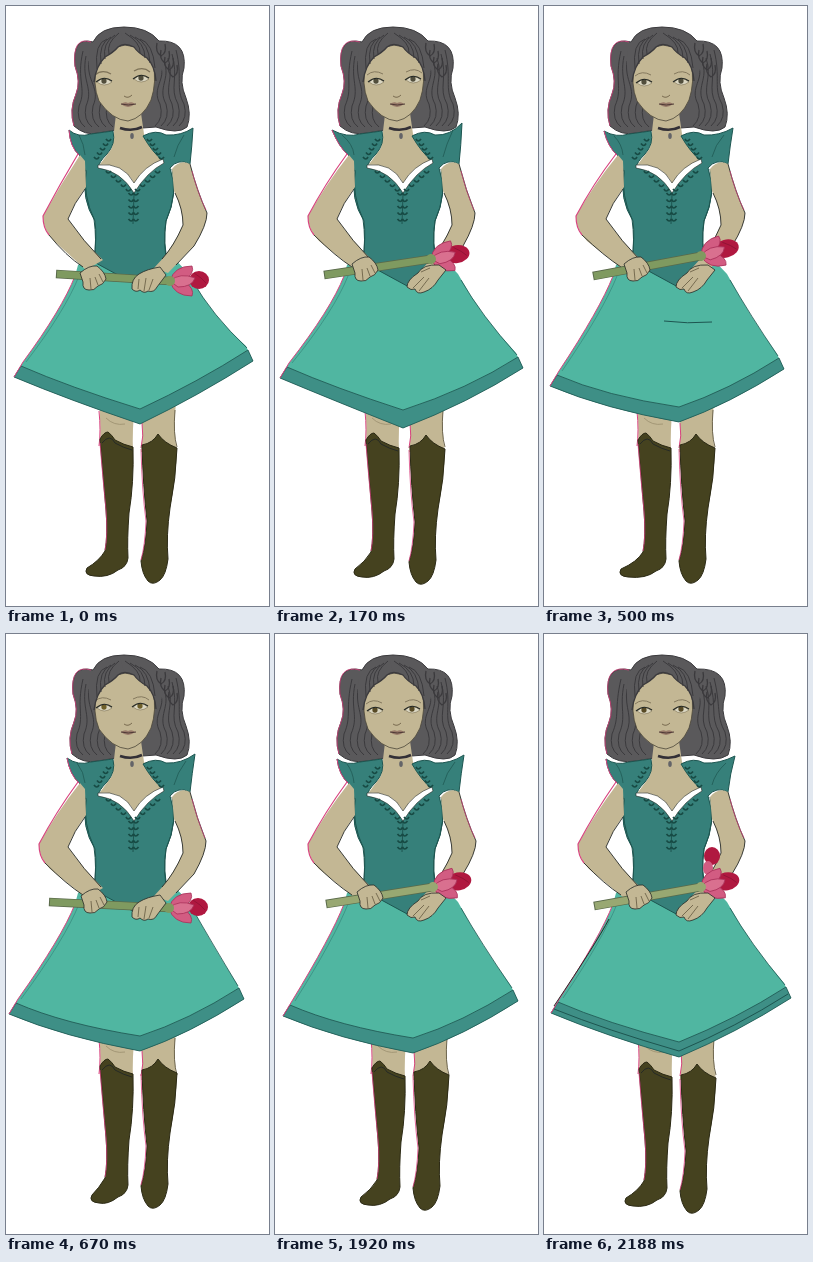
Recreate the animation shown at these times as an HTML page with a canvas. Size 263x600 px, loop 2.26 s.

```html
<!DOCTYPE html>
<html lang="en">
<head>
<meta charset="utf-8">
<title>Girl with a flower</title>
<style>
html, body { margin: 0; width: 100%; height: 100%; overflow: hidden; background: #fff }
canvas { display: block; width: 263px; height: 600px }
</style>
</head>
<body>
<canvas id="stage" width="263" height="600"></canvas>
<script>
const ctx = document.getElementById('stage').getContext('2d');
const LOOP = 2260;
const C = {
  ink: '#262a26', fringe: '#d8437f', skin: '#c3b794', hair: '#5a595b', strand: '#3b3a3d',
  bodice: '#36807a', dark: '#1d5550', skirt: '#50b6a1', hem: '#3e8f86', boot: '#45421f',
  pink: '#d25c82', red: '#b01840'
};

// hair: left and right x; sleeves: tips; elbows: x; hem: left, point, right;
// boots: offsets of left and right; stem: cut end, flower end
const poses = [
  { start: 0, hair: [67, 184], sleeves: [63, 124, 187, 122], elbows: [37, 201], eyes: [98, 76, 135, 73],
    hem: [8, 371, 134, 418, 247, 355], boots: [0, -1, 0, 0], foot: 79,
    stem: [50, 268, 164, 275], tilt: 0, grip: true, hand: [-3, 9], soft: true },
  { start: 170, hair: [64, 184], sleeves: [57, 124, 187, 117], elbows: [33, 200], eyes: [101, 76, 138, 74],
    hem: [5, 372, 128, 422, 248, 362], boots: [-3, 0, -1, 1], foot: 78,
    stem: [49, 269, 156, 253], tilt: -.15, hand: [0, 0], wide: true },
  { start: 330, hair: [63, 186], sleeves: [60, 125, 188, 120], elbows: [30, 199], eyes: [103, 78, 137, 76],
    hem: [3, 378, 132, 416, 241, 361], boots: [-3, 2, -1, 1], foot: 75,
    stem: [48, 272, 150, 239], tilt: -.58, hand: [2, 0], closed: true },
  { start: 500, hair: [65, 184], sleeves: [60, 125, 189, 122], elbows: [32, 201], eyes: [100, 77, 137, 76],
    hem: [6, 380, 135, 416, 240, 363], boots: [0, 0, 0, 0], foot: 75,
    stem: [49, 270, 157, 250], tilt: -.25, hand: [3, 0], crease: true },
  { start: 670, hair: [65, 184], sleeves: [61, 124, 189, 120], elbows: [33, 200], eyes: [98, 74, 134, 73],
    hem: [3, 380, 134, 417, 238, 365], boots: [0, -2, 0, -3], foot: 84,
    stem: [43, 268, 163, 274], tilt: 0, grip: true, hand: [-2, 4], iris: '#6f602b' },
  { start: 1920, hair: [63, 183], sleeves: [62, 125, 189, 121], elbows: [33, 201], eyes: [100, 77, 137, 76],
    hem: [8, 382, 138, 419, 243, 367], boots: [3, 0, 3, -1], foot: 84,
    stem: [51, 270, 158, 253], tilt: -.18, hand: [5, 0], iris: '#574a25', pale: true },
  { start: 2080, hair: [62, 187], sleeves: [62, 125, 191, 122], elbows: [34, 201], eyes: [100, 77, 137, 76],
    hem: [7, 379, 135, 423, 247, 364], boots: [1, 1, 1, 2], foot: 80,
    stem: [50, 272, 157, 253], tilt: -.18, hand: [5, 0], iris: '#574a25', pale: true, echo: true }
];

function fill(d, color, edge, width = 1) {
  const path = new Path2D(d);
  ctx.fillStyle = color;
  ctx.fill(path);
  if (edge) line(path, edge, width);
}

function line(d, color = C.ink, width = 1) {
  ctx.strokeStyle = color;
  ctx.lineWidth = width;
  ctx.stroke(d instanceof Path2D ? d : new Path2D(d));
}

function oval(x, y, rx, ry, color) {
  ctx.beginPath();
  ctx.ellipse(x, y, rx, ry, 0, 0, 7);
  ctx.fillStyle = color;
  ctx.fill();
}

function at(x, y, turn, draw) {
  ctx.save();
  ctx.translate(x, y);
  ctx.rotate(turn);
  draw();
  ctx.restore();
}

function legs({ boots: [lx, ly, rx, ry], foot }) {
  at(lx, 0, 0, () => {
    fill('M93 395L129 395Q126 425 127 446L94 442Q95 420 93 395Z', C.skin);
    line('M93 405Q95 425 93 440', C.fringe);
    line('M100 412Q108 420 119 418', '#a39776');
  });
  at(rx, 0, 0, () => {
    fill('M134 395L170 395Q167 425 171 446L135 446Q138 425 134 395Z', C.skin);
    line('M136 417Q138 430 135 442', C.fringe);
    line('M169 404Q167 428 171 441', '#6d654e');
  });
  const toe = foot - lx;
  at(lx, ly, 0, () => {
    fill(`M94 434Q98 427 102 427Q106 430 109 435Q118 440 127 442Q128 478 123 508
      Q121 535 122 553Q121 562 112 565Q102 573 ${toe + 9} 571Q${toe - 2} 570 ${toe + 2} 563
      Q93 556 99 546Q102 530 100 505Q97 470 94 434Z`, C.boot, '#2b2914');
    line('M94 438Q97 475 100 505Q102 530 99 545', C.fringe, .8);
    line('M96 438Q104 428 109 438Q118 443 126 445');
  });
  at(rx, ry, 0, () => {
    fill(`M136 439Q147 437 152 428Q158 437 171 442Q170 472 164 502Q160 530 162 553
      Q160 569 154 574Q147 580 142 575Q136 568 135 555Q140 540 141 515Q137 480 136 439Z`, C.boot, '#2b2914');
    line('M135 443Q136 485 140 515Q139 540 135 554', C.fringe, .8);
  });
}

function skirt({ hem: [lx, ly, px, py, rx, ry], crease, echo, wide }) {
  const band = wide ? 18 : 15;
  const bottom = `Q${lx + 55} ${ly + 23} ${px} ${py}Q${rx - 55} ${ry + 35} ${rx} ${ry}`;
  fill(`M88 247L72 259L69 270Q56 303 ${lx + 9} ${ly - 15}L${lx} ${ly}${bottom}
    L${rx - 7} ${ry - 15}Q205 309 183 268L163 247Z`, C.skirt);
  fill(`M${lx + 7} ${ly - 11}L${lx} ${ly}${bottom}L${rx - 5} ${ry - 11}
    Q${rx - 55} ${ry + 21} ${px} ${py - band}Q${lx + 55} ${ly + 10} ${lx + 7} ${ly - 11}Z`, C.hem, C.dark, .8);
  line(`M69 270Q56 303 ${lx + 9} ${ly - 15}L${lx} ${ly}`, C.fringe);
  line(`M73 270Q59 305 ${lx + 12} ${ly - 15}`, '#35877b', .7);
  line(`M186 274Q206 309 ${rx - 6} ${ry - 13}`, C.dark, .8);
  if (crease) line('M120 315Q143 318 168 316', C.dark);
  if (echo) {
    line(`M65 285Q53 308 ${lx + 3} ${ly - 7}`, C.ink);
    line(`M${lx + 3} ${ly - 4}Q${lx + 55} ${ly + 17} ${px} ${py - 6}Q${rx - 55} ${ry + 29} ${rx - 3} ${ry - 4}`, C.dark);
  }
}

function hairBack({ hair: [l, r] }) {
  fill(`M118 21Q94 21 87 36Q${l - 1} 30 ${l + 2} 60Q${l + 8} 76 ${l + 3} 88Q${l - 4} 104 ${l + 1} 120
    Q${l + 12} 130 92 127L110 124L150 121Q172 129 ${r - 3} 121Q${r + 2} 108 ${r - 4} 92
    Q${r - 11} 76 ${r - 6} 62Q${r - 3} 34 153 35Q142 21 118 21Z`, C.hair, C.strand);
  line(`M85 36Q${l - 1} 30 ${l + 2} 60Q${l + 8} 76 ${l + 3} 88Q${l - 4} 104 ${l + 1} 120`, C.fringe, .8);
  for (let i = 0; i < 5; i++) {
    const a = l + 6 + i * 7, b = r - 6 - i * 6;
    line(`M${77 + i * 3} ${45 + i * 5}C${70 + i * 5} 75 ${a + 8} 82 ${a} 100Q${a - 3} 114 ${a + 6} 121`, C.strand);
    line(`M${170 - i * 4} ${44 + i * 4}C${177 - i * 4} 72 ${b - 9} 82 ${b} 98Q${b + 4} 112 ${b - 5} 120`, C.strand);
  }
}

function bodice({ sleeves: [lx, ly, rx, ry] }) {
  fill('M111 100L134 100L138 128L159 157L128 184L92 161L106 142Z', C.skin);
  fill(`M${lx} ${ly}Q72 132 85 128L107 125Q110 138 101 148Q92 157 93 161Q115 160 127 184
    Q139 162 158 156Q146 146 137 130Q150 123 160 129Q175 130 ${rx} ${ry}Q186 140 184 158
    Q172 152 164 162Q173 187 160 215Q156 235 163 262L134 281L88 256Q91 230 89 215
    Q75 193 80 166L74 150Q64 141 ${lx} ${ly}Z`, C.bodice, C.dark);
  line(`M${lx} ${ly}Q64 141 73 149`, C.fringe);
  line('M80 164Q77 190 88 213Q91 235 88 252M166 163Q172 187 160 215Q157 240 161 255', C.dark);
  line(`M${lx + 10} ${ly + 5}Q78 138 79 149M${rx - 9} ${ry + 7}Q171 139 168 151`, C.dark, .7);
  fill('M92 159Q117 156 128 177Q138 160 157 153L158 157Q141 166 128 187Q115 165 92 162Z', '#fff', C.ink, .6);
  line('M114 122Q126 126 136 121', '#333036', 2.6);
  oval(126, 130, 1.8, 3, '#646468');
}

function leaf(x, y, side) {
  line(`M${x} ${y}q${side * 2} 4 ${side * 5} 0`, '#174a44', 1.7);
}

function embroidery() {
  line('M128 188L127 218', C.dark);
  for (let i = 0; i < 5; i++)
    for (const side of [-1, 1]) {
      leaf(127.5, 187 + i * 6.5, side);
      leaf(127 + side * (27 - i * 5), 165 + i * 4.5, -side);
      leaf(123 + side * (18 + i * 3), 133 + i * 4.5, side);
    }
}

function arms({ elbows: [l, r] }) {
  fill(`M74 149Q${l + 18} 178 ${l} 210Q${l} 224 ${l + 11} 235L80 264L97 254Q78 236 62 213
    Q68 197 80 181L79 155Z`, C.skin);
  line(`M72 148Q${l + 17} 178 ${l} 210Q${l} 222 ${l + 6} 229`, C.fringe, 1.2);
  line(`M${l + 6} 229Q60 250 77 261M95 253Q78 236 62 213Q68 197 79 183`, C.ink, .9);
  fill(`M166 163Q174 153 184 158Q191 185 ${r} 207Q${r} 219 188 240L162 267L148 262
    Q166 244 177 219Q177 203 168 185Z`, C.skin);
  line(`M184 158Q191 185 ${r} 207Q${r} 219 188 240L170 259M156 253Q168 240 177 219Q177 203 169 187`, C.ink, .9);
  line(`M186 165Q192 188 ${r - 1} 204`, C.fringe, .7);
}

function flower({ stem: [x1, y1, x2, y2], tilt, grip, pale, echo }) {
  if (echo) {
    oval(168, 222, 8, 9, C.red);
    oval(164, 234, 5, 7, C.pink);
  }
  const green = pale ? '#98a872' : '#7f9a60';
  line(`M${x1} ${y1}L${x2} ${y2}`, '#59694a', 8.6);
  line(`M${x1 + 1} ${y1}L${x2} ${y2}`, green, 7.2);
  at(x2, y2, tilt, () => {
    oval(grip ? 29 : 26, -1, grip ? 10 : 13, 9, C.red);
    line('M24 -8Q32 -3 36 2', '#8e1235', .8);
    for (const s of [-1, 1])
      fill(`M0 0Q4 ${s * 15} 22 ${s * 15}Q25 ${s * 8} 14 0Z`, C.pink, '#a92f59', .8);
    fill('M0 0Q10 -9 25 -3Q22 6 8 6Z', '#d9708f', '#a92f59', .8);
    oval(0, 0, 5, 5, green);
  });
}

function hands({ hand: [dx, dy], grip }) {
  at(dx, dy, 0, () => {
    fill('M77 258Q86 250 94 251Q102 257 103 264Q100 270 95 271Q91 276 86 275Q79 275 80 267Z', C.skin, C.ink, .8);
    line('M87 263L88 274M92 262L95 270M96 259L100 267', '#62583f', .8);
  });
  if (grip) {
    fill('M154 261Q141 263 133 268Q125 273 126 283Q130 287 134 284Q138 288 142 285Q148 287 151 281L160 269Z', C.skin, C.ink, .8);
    line('M133 273L132 283M140 272L138 285M147 273L143 284', '#62583f', .8);
  } else {
    fill('M164 259Q148 258 143 267Q132 274 132 281Q136 285 140 283Q142 289 149 286Q158 283 163 274L171 264Z', C.skin, C.ink, .8);
    line('M149 271L138 282M154 272L144 285M146 266L155 262', '#62583f', .8);
  }
}

function face({ eyes: [lx, ly, rx, ry], closed, iris = '#514e3c', soft }) {
  fill('M119 39Q101 42 91 57Q86 78 93 95Q106 114 122 115Q137 112 145 94Q151 76 147 57Q138 41 119 39Z', C.skin, '#4c4739', .8);
  for (const [x, y, s] of [[lx, ly, -1], [rx, ry, 1]]) {
    if (closed) {
      line(`M${x - 8} ${y - 1}Q${x} ${y + 4} ${x + 8} ${y - 1}`, C.ink, 1.5);
    } else {
      fill(`M${x - 7} ${y}Q${x} ${y - 7} ${x + 8} ${y}Q${x} ${y + 6} ${x - 7} ${y}Z`, '#dad6c2', '#817659', .6);
      oval(x, y - 1, 2.6, 2.8, iris);
      line(`M${x - 8} ${y}Q${x} ${y - 7} ${x + 8} ${y - 1}`, C.ink, 1.1);
    }
    line(`M${x - s * 7} ${y - 8}Q${x + s * 2} ${y - 13} ${x + s * 9} ${y - 7}`, '#7d7258', soft ? 1.2 : .9);
  }
  line('M118 90Q122 93 126 89', '#796b50');
  fill('M115 98Q119 95 122 97Q126 95 129 98Q122 104 115 98Z', '#987a69');
  line('M115 98Q122 100 130 98', '#4e3936');
}

function fringe() {
  fill('M118 22Q94 24 84 45Q80 60 88 76Q90 60 99 51Q108 46 112 41L121 38Z', C.hair);
  fill('M114 22Q145 21 154 42Q161 62 150 75Q149 60 141 52Q132 47 128 41L118 38Z', C.hair);
  line('M88 76Q90 60 99 51Q108 46 112 41Q118 36 128 41Q132 47 141 52Q149 60 150 75', C.strand, 1.3);
  for (let i = 0; i < 4; i++) {
    line(`M${113 - i * 4} ${27 + i * 2}Q${100 - i * 4} 37 ${103 - i * 4} ${48 + i * 5}`, C.strand);
    line(`M${119 + i * 5} ${27 + i * 2}Q${135 + i * 4} 37 ${134 + i * 5} ${47 + i * 5}`, C.strand);
  }
  for (let i = 0; i < 4; i++)
    line(`M${151 + i * 4} ${37 + i * 7}q-2 9 4 13q6 -3 4 -12`, C.strand, 1.3);
}

function draw(pose) {
  ctx.clearRect(0, 0, 263, 600);
  ctx.lineJoin = 'round';
  for (const part of [legs, skirt, hairBack, bodice, embroidery, arms, flower, hands, face, fringe]) part(pose);
}

const begin = performance.now();
function tick() {
  const time = (performance.now() - begin) % LOOP;
  draw(poses.findLast(pose => pose.start <= time));
  requestAnimationFrame(tick);
}
tick();
</script>
</body>
</html>
```
